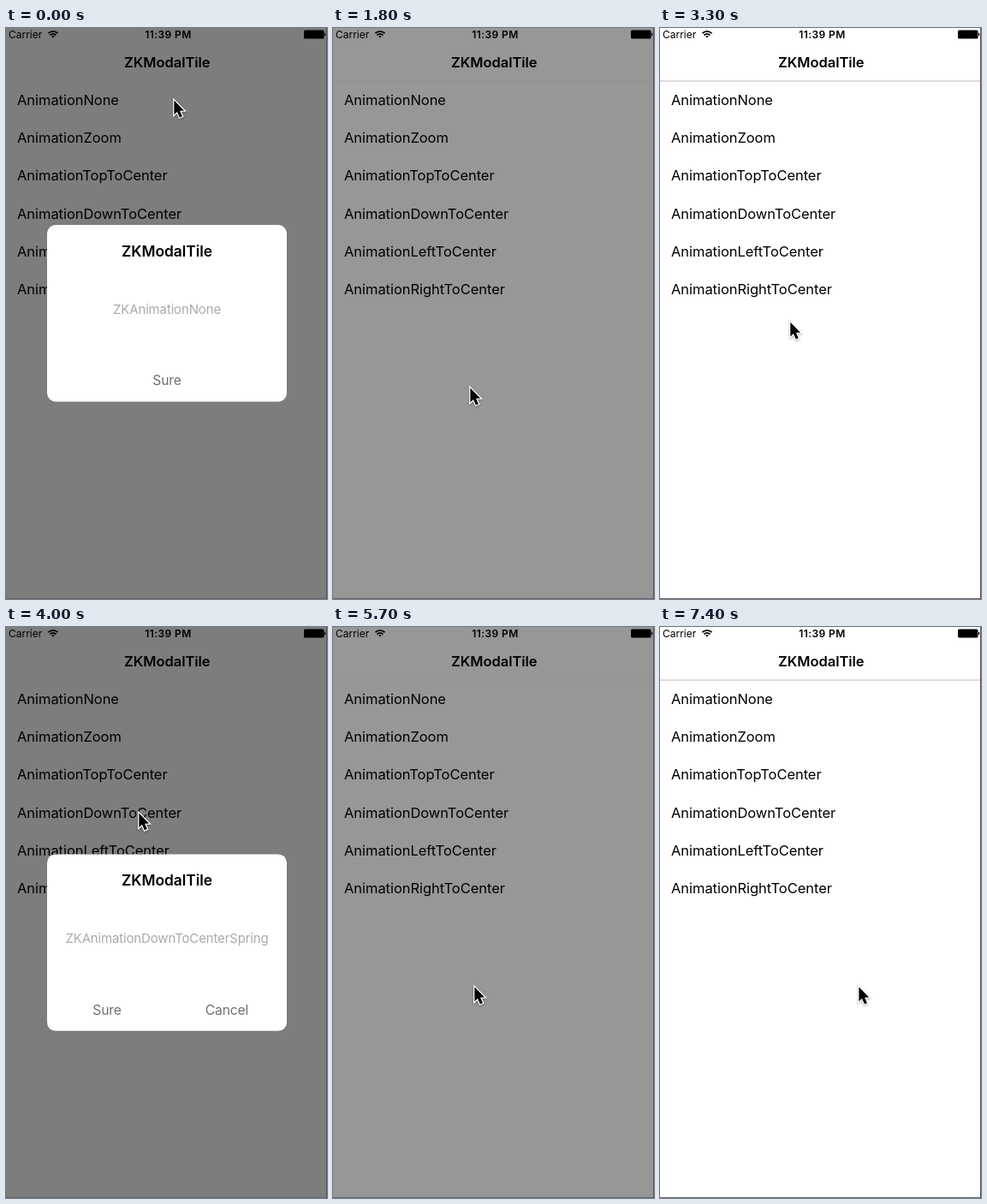
Animation, 375 px wide and 667 px high, one loop 7.5 s. Source, as an HTML page:

```html
<!DOCTYPE html>
<html lang="en">
<head>
<meta charset="utf-8">
<title>Alert demo</title>
<style>
  html, body { margin: 0; width: 100%; height: 100%; overflow: hidden; background: #fff; }
  svg { display: block; width: 375px; height: 667px; }
  text { font: 16.5px Inter, "Liberation Sans", sans-serif; letter-spacing: -.003em; }
  .mid { text-anchor: middle; }
  .bold { font-weight: 600; }
  .status { font-size: 12px; letter-spacing: 0; }
  .heading { font-size: 17.4px; }
  .message { font-size: 15px; fill: #aaa; letter-spacing: -.01em; }
  .button { font-size: 15.7px; fill: #707070; letter-spacing: -.01em; }
</style>
</head>
<body>
<svg viewBox="0 0 375 667">
  <rect width="375" height="667" fill="#fff"/>
  <rect id="press" width="375" height="44" fill="#d9d9d9"/>
  <g id="rows"></g>
  <rect id="rule" y="61.5" width="375" height="1" fill="#bdbdbd"/>
  <text class="mid bold" x="188.3" y="45.8">ZKModalTile</text>
  <text class="status" x="3" y="12">Carrier</text>
  <g fill="none" stroke="#000" stroke-width="1.7">
    <path d="M49.4 6.2Q55 1.4 60.6 6.2M51.5 8.5Q55 5.4 58.5 8.5"/>
    <path d="M53.3 9.7Q55 8.3 56.7 9.7L55 11.6Z" fill="#000" stroke="none"/>
  </g>
  <text class="status mid bold" x="189.5" y="12" style="letter-spacing:.4px">11:39 PM</text>
  <rect x="348" y="2.5" width="23.5" height="10" rx="1.5"/>
  <path d="M372 5.5Q375 7.500 372 9.500Z"/>
  <rect id="cover" width="375" height="667"/>
  <g id="alert">
    <rect x="-140" y="-103.5" width="280" height="206.4" rx="10" fill="#fff"/>
    <text class="heading mid bold" y="-66.5">ZKModalTile</text>
    <text class="message mid" id="message" y="0.5"></text>
    <text class="button mid" id="sure" y="83.8">Sure</text>
    <text class="button mid" id="cancel" x="70" y="83.8">Cancel</text>
  </g>
  <path d="M374.5 0V667" stroke="#555"/>
  <path d="M0 666.5H375" stroke="#666"/>
  <g id="cursor">
    <path d="M0 0V18.5L4 14.8L7.2 22L10.6 20.6L7.4 13.6L13 13.2Z" transform="translate(.4 .6) scale(.9)"
      stroke="#fff" stroke-width="2.8" paint-order="stroke"
      style="filter:drop-shadow(0 1px 1px rgba(0,0,0,.35))"/>
  </g>
</svg>
<script>
const $ = id => document.getElementById(id);
const LOOP = 7500, STEP = 100, FADE = 250;
const ROW = 44.3, FIRST_ROW = 84, BUTTON = 420;

// show, hide: times in ms; rowX, buttonX: where the pointer clicks; dx, dy: side the alert enters from
const scenes = [
  { name: 'None', show: -400, hide: 450, rowX: 196, buttonX: 190 },
  { name: 'Zoom', show: 1070, hide: 1750, rowX: 188, buttonX: 160 },
  { name: 'TopToCenter', show: 2242, hide: 3020, rowX: 184, buttonX: 150, dy: -1 },
  { name: 'DownToCenter', show: 3700, hide: 4450, rowX: 155, buttonX: 235, dy: 1 },
  { name: 'LeftToCenter', show: 4960, hide: 5650, rowX: 198, buttonX: 165, dx: -1 },
  { name: 'RightToCenter', show: 6050, hide: 7050, rowX: 147, buttonX: 232, dx: 1 }
];
scenes.forEach((s, i) => {
  s.press = s.show - 80;
  s.rowY = FIRST_ROW + i * ROW;
});

$('rows').innerHTML = scenes.map(s =>
  `<text x="13" y="${s.rowY + 5.6}">Animation${s.name}</text>`).join('');

const ramp = (t, from, to) => Math.max(0, Math.min(1, (t - from) / (to - from)));
const mix = (a, b, k) => a + (b - a) * k;
const visible = (el, on) => el.setAttribute('visibility', on ? 'visible' : 'hidden');

function smooth(t, from, to) {
  const k = ramp(t, from, to);
  return k * k * (3 - 2 * k);
}

// Remaining share of a damped spring's travel
function spring(ms) {
  const t = ms / 1000;
  return ms > 800 ? 0 : Math.exp(-8.6 * t) * (Math.cos(6.5 * t) + 1.33 * Math.sin(6.5 * t));
}

// From the row down to the button, then on to the next row
function pointer(t, s, next) {
  const down = smooth(t, s.show + 400, s.hide - 150);
  const on = next ? smooth(t, s.hide + 50, next.press) : 0;
  const x = mix(s.rowX, s.buttonX, down), y = mix(s.rowY, BUTTON, down);
  return next ? [mix(x, next.rowX, on), mix(y, next.rowY, on)] : [x, y];
}

function draw(t) {
  const index = scenes.findLastIndex(s => t >= s.press);
  const s = scenes[index];
  const shown = t >= s.show && t < s.hide;
  const dim = ramp(t, s.show, s.show + FADE) - ramp(t, s.hide, s.hide + FADE);

  visible($('press'), t >= s.press && t < s.show);
  $('press').setAttribute('y', Math.round(s.rowY - 22));
  $('cover').setAttribute('opacity', dim * 0.51);
  $('rule').setAttribute('opacity', 1 - dim);

  visible($('alert'), shown);
  if (shown) {
    const { name, dx = 0, dy = 0 } = s, rest = spring(t - s.show);
    const scale = name === 'Zoom' ? 1 - rest : 1;
    $('alert').setAttribute('transform',
      `translate(${188 + dx * 468 * rest} ${333.5 + dy * 540 * rest}) scale(${scale})`);
    $('message').textContent = 'ZKAnimation' + name + (dx || dy ? 'Spring' : '');
    $('sure').setAttribute('x', index ? -70 : 0);
    $('cancel').setAttribute('display', index ? 'inline' : 'none');
  }
  $('cursor').setAttribute('transform', `translate(${pointer(t, s, scenes[index + 1])})`);
}

const start = performance.now();
function tick() {
  const t = (performance.now() - start) % LOOP;
  draw(Math.floor(t / STEP) * STEP);
  requestAnimationFrame(tick);
}
tick();
</script>
</body>
</html>
```
